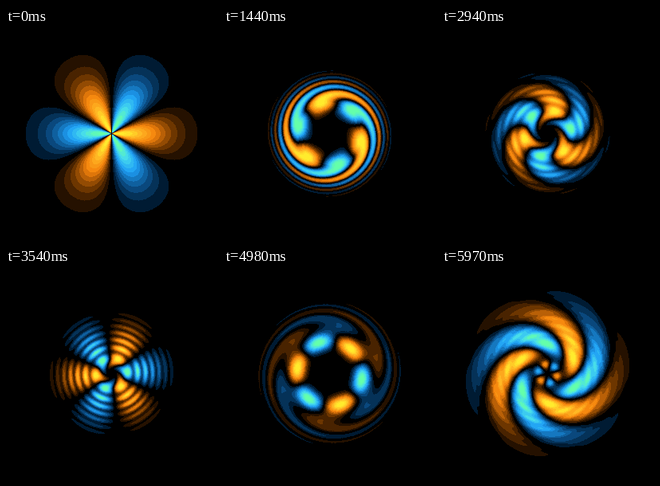
Recreate the animation shown at these times as an HTML page with a canvas. Size 266 by 266 pixels, loop 6000 ms.

```html
<!DOCTYPE html>
<html lang="en">
<head>
<meta charset="utf-8">
<title>Threefold wave</title>
<style>
html, body { margin: 0; width: 100%; height: 100%; overflow: hidden; background: #000; }
canvas { display: block; width: 100vw; height: 100vh; }
</style>
</head>
<body>
<canvas id="stage" width="266" height="266"></canvas>
<script>
const SIZE = 266, CENTER = 132.5, LOOP = 6000, STEP = 30;
const LEVELS = 14, SUB = 4, RMAX = 118;

const ctx = document.getElementById('stage').getContext('2d');
const image = ctx.createImageData(SIZE, SIZE);

// A ring is a lopsided Gaussian in r. Its crest angle (degrees) is
// turn + swirl * d, plus hook * d² inside the peak or bend * d² outside it.
const base = { peak: 1, swirl: 0, hook: 0, bend: 0, ripple: 0 };
const key = (t, r, inner, outer, turn, more) => ({ ...base, t, r, inner, outer, turn, ...more });

const rings = [
  [ // main wave
    key(0, 0, 9, 47, 0),
    key(630, 33, 9, 30, -2, { hook: .05, bend: -.031, ripple: .18 }),
    key(1440, 40, 8, 17, -14, { hook: .03, bend: -.21 }),
    key(2340, 40, 11, 15, -42, { hook: .16, bend: .088 }),
    key(3540, 20, 6, 27, -54, { hook: .25, ripple: .5 }),
    key(4980, 41, 7, 7, -70),
    key(5970, 38, 9, 30, -87, { swirl: 1.6, ripple: .1 })
  ],
  [ // trailing halo
    key(3540, 50, 8, 15, -80, { peak: 0 }),
    key(4980, 60, 8, 20, -103, { peak: .22, bend: .2 }),
    key(5970, 70, 8, 20, -120, { peak: 0, bend: .1 })
  ],
  [ // returning core
    key(4980, 18, 5, 4, -110, { peak: .06 }),
    key(5970, 12, 4, 3.5, -135, { peak: .55 })
  ]
];

const lerp = (a, b, u) => a + (b - a) * u;

function ringAt(keys, t) {
  if (t < keys[0].t) return null;
  let i = 0;
  while (i < keys.length - 2 && t >= keys[i + 1].t) i++;
  const a = keys[i], b = keys[i + 1], u = Math.min(1, (t - a.t) / (b.t - a.t));
  return Object.fromEntries(Object.keys(a).map(k => [k, lerp(a[k], b[k], u)]));
}

// Complex value of a ring at radius r, as [size, phase]
function sample(ring, r) {
  const d = r - ring.r, out = d > 0;
  const cycles = out ? (d / 13) ** 1.23 : 0;
  const fringe = (1 + ring.ripple * Math.cos(2 * Math.PI * cycles)) / (1 + ring.ripple);
  const size = ring.peak * fringe * Math.exp(-((d / (out ? ring.outer : ring.inner)) ** 2) / 2);
  const crest = ring.turn + ring.swirl * d + (out ? ring.bend : ring.hook) * d * d;
  return [size, crest * Math.PI / 60];
}

function ramp(stops) {
  return Array.from({ length: LEVELS + 1 }, (_, n) => {
    if (n === 0) return [0, 0, 0];
    const v = n / LEVELS;
    let i = 1;
    while (i < stops.length - 1 && v > stops[i][0]) i++;
    const a = stops[i - 1], b = stops[i];
    const u = Math.max(0, Math.min(1, (v - a[0]) / (b[0] - a[0])));
    return [1, 2, 3].map(k => lerp(a[k], b[k], u));
  });
}

const warm = ramp([[.07, 36, 17, 0], [.22, 112, 55, 0], [.47, 245, 130, 12], [.7, 255, 180, 35], [.9, 255, 235, 45]]);
const cool = ramp([[.07, 0, 27, 50], [.22, 10, 74, 128], [.47, 30, 158, 245], [.7, 70, 218, 238], [.9, 100, 255, 170]]);

const cells = [];
for (let y = 0; y < SIZE; y++) {
  for (let x = 0; x < SIZE; x++) {
    const p = (y * SIZE + x) * 4;
    const dx = x + .5 - CENTER, dy = CENTER - y - .5, r = Math.hypot(dx, dy);
    image.data[p + 3] = 255;
    if (r >= RMAX) continue;
    const a = 3 * Math.atan2(dy, dx);
    cells.push({ p, k: Math.round(r * SUB), c: Math.cos(a), s: Math.sin(a) });
  }
}

const re = new Float64Array(RMAX * SUB + 1), im = new Float64Array(RMAX * SUB + 1);

function solve(t) {
  const live = rings.map(keys => ringAt(keys, t)).filter(Boolean);
  for (let k = 0; k < re.length; k++) {
    const r = k / SUB, core = Math.min(1, r / 3);
    re[k] = im[k] = 0;
    for (const ring of live) {
      const [size, phase] = sample(ring, r);
      re[k] += core * size * Math.cos(phase);
      im[k] += core * size * Math.sin(phase);
    }
  }
}

function draw(t) {
  solve(t);
  const px = image.data;
  for (const { p, k, c, s } of cells) {
    const v = re[k] * c + im[k] * s;
    const n = Math.min(LEVELS, Math.floor(Math.abs(v) * LEVELS));
    const rgb = (v > 0 ? warm : cool)[n];
    px[p] = rgb[0];
    px[p + 1] = rgb[1];
    px[p + 2] = rgb[2];
  }
  ctx.putImageData(image, 0, 0);
}

const start = performance.now();
let shown = -1;
function tick() {
  const t = Math.floor(((performance.now() - start) % LOOP) / STEP) * STEP;
  if (t !== shown) draw(shown = t);
  requestAnimationFrame(tick);
}
tick();
</script>
</body>
</html>
```
